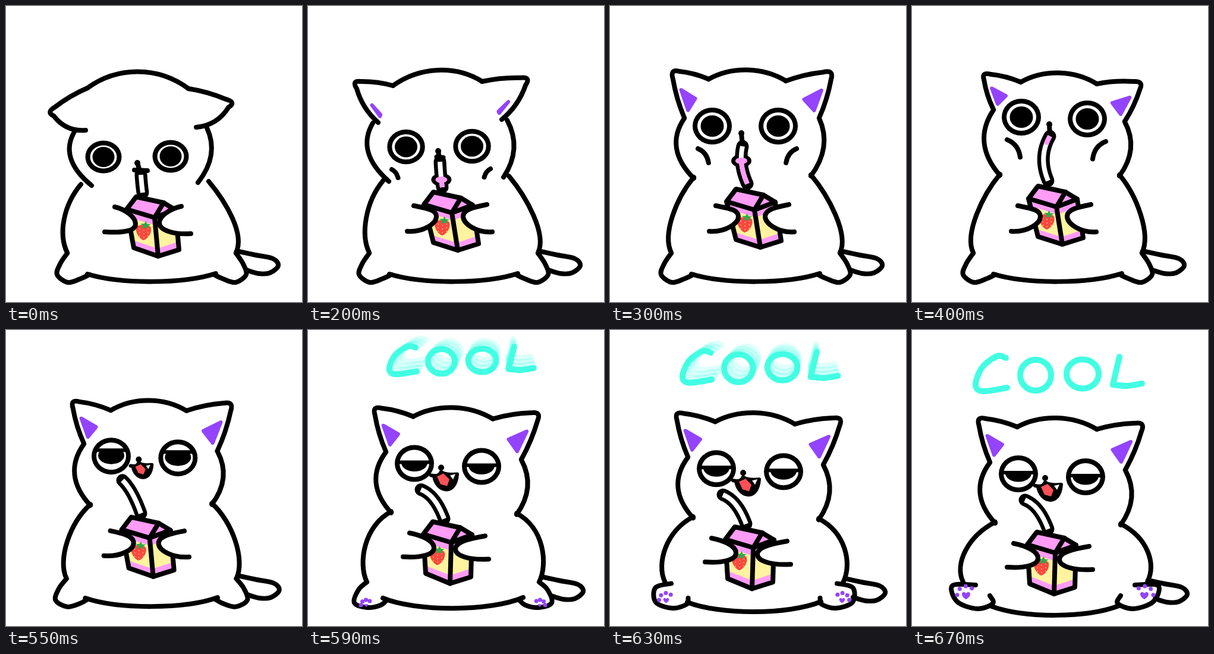
An HTML page with a canvas that plays this animation: 498x498 px, repeating every 2670 ms.

```html
<!DOCTYPE html>
<html lang="en">
<head>
<meta charset="utf-8">
<title>Cool cat</title>
<style>
html, body { margin: 0; width: 100%; height: 100%; overflow: hidden; background: #fff; }
canvas { display: block; width: 100vw; height: 100vh; }
</style>
</head>
<body>
<canvas id="stage" width="498" height="498"></canvas>
<script>
const ctx = document.getElementById('stage').getContext('2d');
const LOOP = 2670, SETTLE = 590, REST = 670;
const INK = '#000', PINK = '#ff9cf6', CREAM = '#fff3a0', PURPLE = '#9443ff', AQUA = '#42ffe3';

// Key points of each pose; everything else follows from them.
// ears: [notch, tip, root] per side; arms: [wrist top, fingertip, wrist bottom] per side.
// curl: how far the ears hang, lean: tilt of the carton, belly: how wide the cat sits.
const seat = {
  curl: 0, lean: 12, belly: 0, axis: 245, hip: [103, 415], tail: [0, 0],
  foot: [[103,416], [91,434], [86,452], [104,465], [125,459], [140,452]],
  floor: [137, 451, 468],
  arms: [[[178,336], [216,354], [167,379]], [[301,334], [261,354], [310,380]]]
};

const droop = {
  ...seat, curl: 1, lean: 8,
  ears: [[[137,138], [67,179], [134,209]], [[307,139], [388,162], [320,204]]],
  neck: [[144,302], [323,297]], eyes: [[164,254], [277,253]],
  nose: [221,264], straw: [[227,284], [228,300], [230,314]], box: [203,342],
  arms: [[[183,338], [218,367], [166,380]], [[295,337], [258,365], [311,383]]]
};

const sip = {
  ...seat, curl: .5, puff: .5, juice: [.7, 1],
  ears: [[[143,134], [73,125], [118,196]], [[293,127], [376,119], [326,191]]],
  neck: [[136,295], [329,288]], eyes: [[165,237], [276,236]],
  nose: [219,244], straw: [[222,262], [223,284], [226,305]], box: [195,334]
};

const gulp = {
  ...seat, puff: .85, juice: [.4, 1],
  ears: [[[166,123], [101,106], [125,188]], [[296,126], [377,107], [352,188]]],
  neck: [[141,290], [338,286]], eyes: [[172,202], [283,202]],
  nose: [221,214], straw: [[223,236], [216,266], [231,299]], box: [196,329]
};

const stretch = {
  ...seat, puff: 1.05, juice: [0, .2],
  ears: [[[183,128], [117,111], [137,174]], [[311,131], [390,126], [358,194]]],
  neck: [[148,285], [349,286]], eyes: [[184,187], [295,190]],
  nose: [231,199], straw: [[232,219], [212,254], [229,294]], box: [196,324]
};

const done = {
  ...seat, lid: -14, mouth: .72,
  ears: [[[176,130], [108,111], [131,184]], [[300,129], [379,111], [354,196]]],
  neck: [[143,289], [344,285]], eyes: [[176,206], [288,208]],
  nose: [223,211], straw: [[199,245], [212,264], [226,304]], box: [195,332]
};

const upper = {
  ears: [[[177,163], [108,145], [131,222]], [[311,167], [393,154], [359,235]]],
  neck: [[140,325], [351,328]], eyes: [[179,242], [292,247]],
  nose: [224,249], straw: [[190,286], [214,295], [229,335]], box: [194,361],
  arms: [[[171,359], [212,384], [160,399]], [[298,364], [248,386], [304,403]]]
};
const smug = { curl: 0, lean: 0, belly: 1, lid: -2, mouth: 1 };

const slump = {
  ...raise(upper, 17.5), ...smug, axis: 244, hip: [99,424], tail: [5, 3], paw: [98, 463, 9],
  foot: [[99,424], [85,437], [78,459], [100,467], [122,463], [132,455]],
  floor: [126, 451, 474]
};

const cool = {
  ...upper, ...smug, axis: 241, hip: [86,424], tail: [5, 8], paw: [91, 446, 15],
  foot: [[107,429], [68,430], [76,457], [110,469], [136,460], [131,447]],
  floor: [134, 465, 485]
};

function raise(v, dy) {
  if (Array.isArray(v)) return typeof v[0] === 'number' ? [v[0], v[1] - dy] : v.map(p => raise(p, dy));
  return Object.fromEntries(Object.entries(v).map(([k, p]) => [k, raise(p, dy)]));
}

function mix(a, b, t) {
  if (typeof a === 'number') return a + (b - a) * t;
  if (Array.isArray(a)) return a.map((v, i) => mix(v, b[i], t));
  return Object.fromEntries(Object.keys(a).map(k => [k, mix(a[k], b[k], t)]));
}

const add = (p, x, y) => [p[0] + x, p[1] + y];
const flip = (p, axis, side) => side < 0 ? p : [2 * axis - p[0], p[1]];

function stroke(color = INK, width = 8) {
  ctx.strokeStyle = color;
  ctx.lineWidth = width;
  ctx.stroke();
}

function fill(color) {
  ctx.fillStyle = color;
  ctx.fill();
}

function trace(pts, closed) {
  ctx.beginPath();
  pts.forEach(p => ctx.lineTo(...p));
  if (closed) ctx.closePath();
}

function curve(a, ...rest) {
  ctx.beginPath();
  ctx.moveTo(...a);
  for (let i = 0; i < rest.length; i += 3) ctx.bezierCurveTo(...rest[i], ...rest[i + 1], ...rest[i + 2]);
}

function spline(pts) {
  const at = i => pts[Math.max(0, Math.min(pts.length - 1, i))];
  const arm = (p, q, r) => add(p, (r[0] - q[0]) / 6, (r[1] - q[1]) / 6);
  const rest = [];
  for (let i = 0; i < pts.length - 1; i++)
    rest.push(arm(at(i), at(i - 1), at(i + 1)), arm(at(i + 1), at(i + 2), at(i)), at(i + 1));
  curve(pts[0], ...rest);
}

function oval(color, x, y, rx, ry = rx) {
  ctx.beginPath();
  ctx.ellipse(x, y, rx, ry, 0, 0, 7);
  fill(color);
}

// Control point that bows the edge from a to b sideways.
function bow(a, b, d) {
  const len = Math.hypot(b[0] - a[0], b[1] - a[1]);
  return add(mix(a, b, .5), (b[1] - a[1]) / len * d, -(b[0] - a[0]) / len * d);
}

function drawEar([notch, tip, root], side, curl) {
  const a = mix(tip, notch, .22), b = mix(tip, root, .2);
  if (curl < 1) {
    const tri = [
      mix(mix(tip, root, .42 + .4 * curl), notch, .12),
      mix(notch, root, .5 + .6 * curl),
      mix(root, notch, .15)
    ];
    const mid = mix(mix(tri[0], tri[1], .5), tri[2], 1 / 3);
    trace(tri.map(p => mix(p, mid, .14)), true);
    fill(PURPLE);
    stroke(PURPLE, 6);
  }
  ctx.beginPath();
  ctx.moveTo(...notch);
  ctx.quadraticCurveTo(...bow(notch, a, side * 4), ...a);
  ctx.quadraticCurveTo(...tip, ...b);
  ctx.quadraticCurveTo(...bow(b, root, side * (4 + 12 * curl)), ...root);
  stroke();
}

function drawHead(s) {
  const [l, r] = s.ears.map(e => e[0]);
  const lift = -(17 + 11 * s.curl) * 4 / 3;
  curve(l, add(mix(l, r, .3), 0, lift), add(mix(l, r, .7), 0, lift), r);
  stroke();
  [-1, 1].forEach((side, i) => {
    const ear = s.ears[i], neck = s.neck[i];
    drawEar(ear, side, s.curl);
    const jaw = add(ear[2], side * 18 * s.curl, 1);
    const puff = side * (i ? 19 : 28);
    curve(jaw, add(mix(jaw, neck, .33), puff, 0), add(mix(jaw, neck, .67), puff, 0), neck);
    stroke();
    drawEye(s.eyes[i], s);
    if (s.puff) {
      const from = add(s.eyes[i], i ? 31 : -24, 38);
      const to = add(from, -side * 21 * s.puff, 28 * s.puff);
      ctx.beginPath();
      ctx.moveTo(...from);
      ctx.quadraticCurveTo(to[0] + side * 3, from[1] + 7 * s.puff, ...to);
      stroke();
    }
  });
}

function drawEye([x, y], { curl, lid }) {
  const rx = 29 - 2.5 * curl, ry = 27 - 3.5 * curl;
  oval(INK, x, y, rx + 4, ry + 4);
  oval('#fff', x, y, rx - 4, ry - 4);
  if (lid === undefined) return oval(INK, x, y, 19.5 - curl, 18 - curl);
  ctx.save();
  ctx.beginPath();
  ctx.rect(x - 40, y + lid, 80, 60);
  ctx.clip();
  oval(INK, x, y - 1, 22, 14.5);
  ctx.restore();
  trace([[x - rx + 3, y + lid], [x + rx - 3, y + lid]]);
  stroke(INK, 6);
}

function drawMouth({ nose, mouth, straw, curl }) {
  if (mouth) {
    const at = (x, y) => add(nose, x * mouth, y * mouth);
    curve(at(-12, 14), at(-9, 40), at(24, 50), at(27, 11), at(16, 12), at(6, 12), at(0, 7), at(-3, 14), at(-8, 14), at(-12, 14));
    fill(INK);
    stroke(INK, 6);
    trace([at(-17, 13), at(-10, 14)]);
    stroke(INK, 6);
    trace([at(-7, 15), at(4, 10), at(14, 20), at(10, 31), at(-1, 28)], true);
    fill('#ff5057');
    trace([at(15, 13), at(24, 11), at(20, 20)], true);
    fill('#fff');
  } else {
    trace([nose, straw[0]]);
    stroke();
    trace([add(straw[0], -11 * curl, -8), add(straw[0], 11 * curl, -7)]);
    stroke();
  }
  oval(INK, ...nose, 5);
}

function drawBody(s) {
  const [fx, fy, sag] = s.floor;
  const [tx, ty] = s.tail;
  spline([[392,413], [420,419], [449,425], [458,437], [444,449], [424,450], [404,444]].map(p => add(p, tx, ty)));
  stroke();
  curve([fx, fy], [fx + 55, sag], [2 * s.axis - fx - 55, sag], [2 * s.axis - fx, fy - 1]);
  stroke();
  [-1, 1].forEach((side, i) => {
    const m = p => flip(p, s.axis, side);
    const shoulder = add(s.neck[i], side * 18 * s.curl, -2);
    const hip = m(s.hip);
    curve(shoulder, add(shoulder, side * (30 + 16 * s.belly), 36 - 12 * s.belly), add(hip, side * 15, -31), hip);
    stroke();
    spline(s.foot.map(m));
    stroke();
    if (s.paw) drawPaw(s.paw, m);
  });
}

function drawPaw([x, y, spread], m) {
  for (let i = 0; i < 4; i++) {
    const a = -.87 - .75 * i;
    oval(PURPLE, ...m([x + spread * Math.cos(a), y + spread * Math.sin(a)]), 3.5);
  }
  const c = m([x, y]), r = (spread - 5) * .6;
  curve(add(c, 0, r * 1.2), add(c, -r * 2, 0), add(c, -r, -r * 1.5), add(c, 0, -r * .5),
    add(c, r, -r * 1.5), add(c, r * 2, 0), add(c, 0, r * 1.2));
  fill(PURPLE);
}

function drawBerry(x, y) {
  ctx.save();
  ctx.translate(x, y);
  curve([-1, 15], [-10, 11], [-17, -4], [-10, -9], [-6, -11], [8, -13], [12, -6], [14, 3], [6, 14], [-1, 15]);
  fill('#f9483f');
  for (let i = 0; i < 9; i++) oval('#ffc27a', -7 + (i % 3) * 7, -4 + Math.floor(i / 3) * 6 + (i % 3 === 1 ? 2 : 0), .9);
  const leaf = Array.from({ length: 10 }, (_, i) => {
    const a = i * Math.PI / 5 - 1.5, r = i % 2 ? 4 : 9;
    return [3 + r * Math.cos(a), -10 + r * .8 * Math.sin(a)];
  });
  trace(leaf, true);
  fill('#2fa84c');
  ctx.restore();
}

function drawBox({ box: a, lean }) {
  const b = add(a, 16, -21), c = add(a, 47, 14), d = add(a, 62, -11), e = add(a, 82, 1);
  const f = add(a, 45 + lean, 83 - lean / 2), g = add(a, 4 + lean, 66 - lean / 6), h = add(a, 80 + lean, 72 - lean / 2);
  trace([a, b, d, e, h, f, g], true);
  fill(PINK);
  for (const [u, v, w, z] of [[a, c, f, g], [c, e, h, f]]) {
    trace([mix(u, z, .2), mix(v, w, .2), mix(v, w, .8), mix(u, z, .8)], true);
    fill(CREAM);
  }
  drawBerry(a[0] + 24 + lean * .6, a[1] + 37);
  for (const run of [[a, b, d, c, a, g, f, c], [d, e, h, f], [c, e]]) {
    trace(run);
    stroke();
  }
}

function drawStraw({ straw: [a, b, c], juice }) {
  const at = t => mix(mix(a, b, t), mix(b, c, t), t);
  const run = (from, to) => trace(Array.from({ length: 13 }, (_, i) => at(from + (to - from) * i / 12)));
  const bulge = juice && juice[0] > 0 && at(juice[0]);
  run(0, 1);
  stroke(INK, 21);
  if (bulge) oval(INK, ...bulge, 17, 11);
  ctx.lineCap = 'butt';
  run(0, 1);
  stroke('#fff', 8);
  if (juice) {
    run(...juice);
    stroke(PINK, 8);
  }
  ctx.lineCap = 'round';
  if (bulge) oval(PINK, ...bulge, 10, 5.5);
}

function drawArm([top, tip, end]) {
  curve(top, [mix(top[0], tip[0], .5), top[1] + 4], [tip[0], tip[1] - 12], tip,
    [tip[0], tip[1] + 12], [mix(tip[0], end[0], .45), end[1] + 2], end);
  fill('#fff');
  stroke();
}

// Hand-lettered word; s runs from 0 (falling in) to 1 (settled).
function drawWord(s, alpha) {
  const sx = mix(.868, 1, s), sy = mix(.8, 1, s), tx = mix(44, 0, s), ty = mix(-8, 0, s);
  const at = ([x, y]) => [x * sx + tx, y * sy + ty];
  const put = pts => { spline(pts.map(at)); stroke(AQUA, 10); };
  const ring = (x, y, rx, ry) => {
    ctx.beginPath();
    ctx.ellipse(...at([x, y]), rx * sx, ry * sy, 0, 0, 7);
    stroke(AQUA, 10);
  };
  ctx.globalAlpha = alpha;
  put([[158,47], [143,44], [118,63], [107,92], [119,103], [160,97]]);
  ring(208, 76, 26, 26);
  ring(287, 74, 27, 24.5);
  put([[349,45], [344,66], [338,92]]);
  put([[338,92], [362,94], [387,90]]);
  ctx.globalAlpha = 1;
}

function poseAt(t) {
  if (t < 500) return [droop, sip, gulp, stretch][Math.max(0, t / 100 - 1)];
  if (t < SETTLE) return mix(done, slump, Math.max(0, t - 530) / 60);
  return mix(slump, cool, (t - SETTLE) / (REST - SETTLE));
}

// The picture holds, then advances in 100 ms and finally 20 ms steps.
function stepAt(t) {
  if (t < 200) return 0;
  if (t < 550) return Math.min(500, Math.floor(t / 100) * 100);
  return Math.min(REST, 550 + Math.floor((t - 550) / 20) * 20);
}

function draw(time) {
  const t = stepAt(time % LOOP), pose = poseAt(t);
  ctx.lineCap = ctx.lineJoin = 'round';
  ctx.fillStyle = '#fff';
  ctx.fillRect(0, 0, 498, 498);
  if (t >= 570) {
    const s = (t - SETTLE) / (REST - SETTLE);
    if (s < 1) for (let k = 3; k > 0; k--) drawWord(s - k / 4, .32 - k * .05);
    drawWord(s, 1);
  }
  drawBody(pose);
  drawHead(pose);
  drawMouth(pose);
  drawBox(pose);
  drawStraw(pose);
  pose.arms.forEach(drawArm);
}

let start;
function tick(now) {
  if (start === undefined) start = now;
  draw(Math.max(0, now - start));
  requestAnimationFrame(tick);
}
draw(0);
requestAnimationFrame(tick);
</script>
</body>
</html>
```
